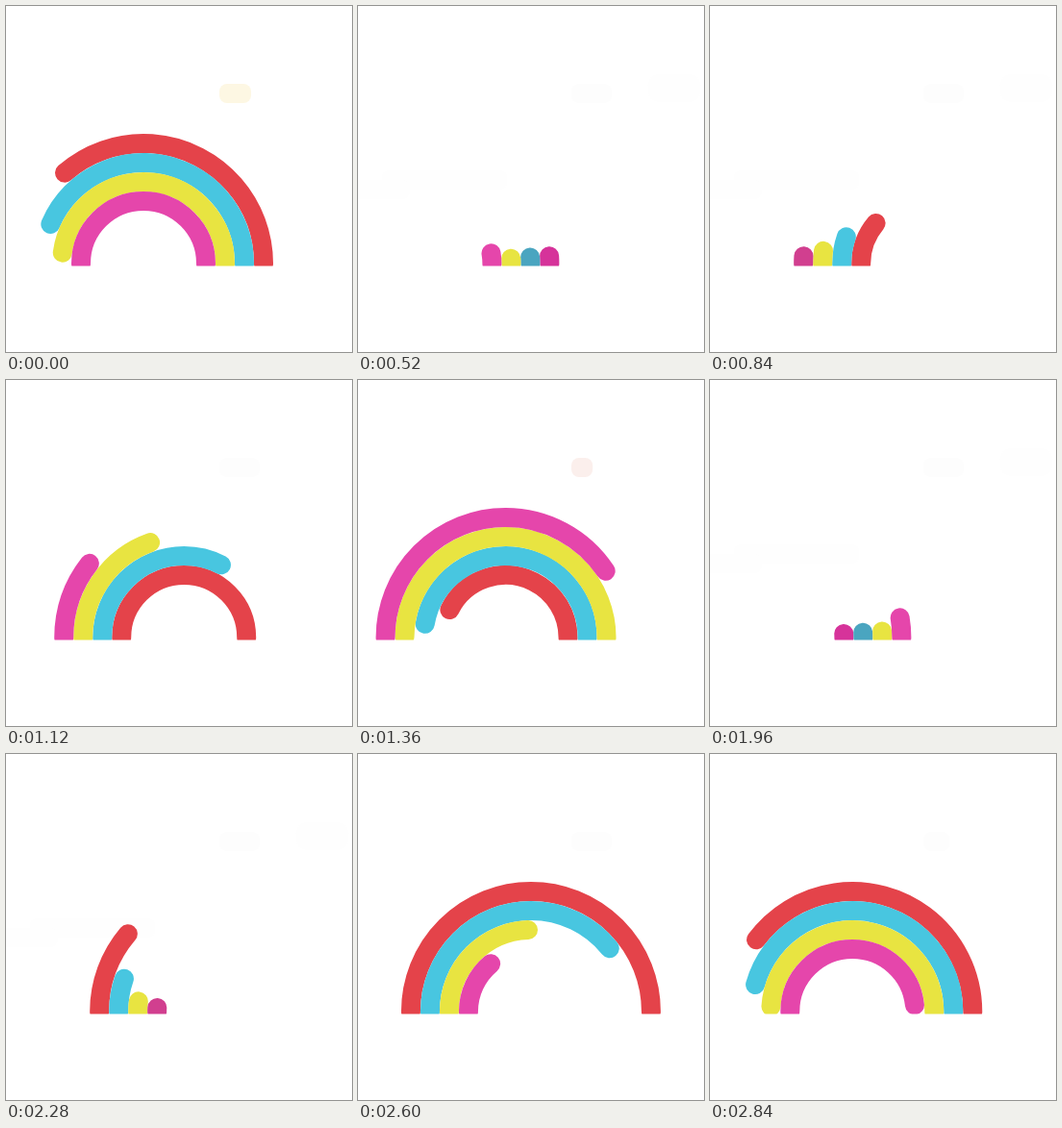
Write an HTML page with a canvas that moves like this. It is 360 px wide and 360 px high and loops after 2.88 s.

```html
<!DOCTYPE html>
<html lang="en">
<head>
<meta charset="utf-8">
<title>Walking rainbow</title>
<style>
  html, body { margin: 0; width: 100%; height: 100%; overflow: hidden; background: #fff; }
  canvas { display: block; width: 100%; height: 100%; }
</style>
</head>
<body>
<canvas id="stage" width="360" height="360"></canvas>
<script>
const ctx = document.getElementById('stage').getContext('2d');

const LOOP = 2880, STEP = 40;
const HOP = LOOP / 2;        // one stride of the whole rainbow
const HOP_START = 600;       // when the first stride begins
const TRAVEL = 520;          // time an end needs to cross the arch
const TAIL_DELAY = 560;      // the tail follows the head
const STAGGER = 96;          // delay from band to band
const STRIDE = 190;          // ground scrolled per stride
const CENTER_Y = 268, GROUND = 270.5;
const STUB = 0.02 * Math.PI; // part that stays above ground at rest

// Bands in the order they leap; tints apply while they wait as stubs.
const BANDS = [
  { color: '#e4434a', landed: '#d6339a' },
  { color: '#48c6e0', landed: '#4aa5c0' },
  { color: '#e8e441' },
  { color: '#e546ab', waiting: '#d13f8f' }
];

const mod = (a, n) => ((a % n) + n) % n;
const clamp = (v, lo = 0, hi = 1) => Math.min(hi, Math.max(lo, v));
const ease = u => 0.2 * u + 0.8 * u ** 2.5;
const sweep = time => (Math.PI - STUB) * ease(clamp(time / TRAVEL));

function pill(x, y, w, h, color) {
  ctx.fillStyle = color;
  ctx.beginPath();
  ctx.roundRect(x, y, w, h, Math.min(w, h) * 0.4);
  ctx.fill();
}

function drawClouds(t) {
  const phase = mod(t + 80, HOP) - 80;
  let color = '#fdfdfd';
  if (t < 80) color = '#fdf7e3';
  else if (t >= 1320 && t < 1400) color = '#fbefec';
  pill(222, 81, clamp(33 + phase * 0.135, 22, 42), 20, color);
  if (phase >= 200 && phase < 900) pill(302, 71, 54, 29, '#fefefe');
  if (phase >= 500 && phase < 900) {
    pill(25, 171, 130, 20, '#fefefe');
    pill(-10, 181, 64, 20, '#fefefe');
  }
}

function drawBand(band, order, radius, centerX, time) {
  const headTime = time - order * STAGGER;
  const tailTime = headTime - TAIL_DELAY;
  const head = STUB + sweep(headTime);
  const tail = sweep(tailTime);
  let color = band.color;
  if (headTime <= 0 && band.waiting) color = band.waiting;
  if (tailTime >= TRAVEL && band.landed) color = band.landed;
  ctx.strokeStyle = color;
  ctx.beginPath();
  ctx.arc(centerX, CENTER_Y, radius, Math.PI + tail, Math.PI + head);
  ctx.stroke();
}

function draw(t) {
  ctx.fillStyle = '#fff';
  ctx.fillRect(0, 0, 360, 360);
  drawClouds(t);

  const time = mod(t - HOP_START, HOP);
  const outward = t >= HOP_START && t < HOP_START + HOP; // first band is innermost
  const centerX = 143 - STRIDE * (time - 840) / HOP;

  ctx.save();
  ctx.beginPath();
  ctx.rect(0, 0, 360, GROUND);
  ctx.clip();
  ctx.lineWidth = 20;
  ctx.lineCap = 'round';
  BANDS.forEach((band, i) => {
    const radius = 65 + 20 * (outward ? i : 3 - i);
    drawBand(band, i, radius, centerX, time);
  });
  ctx.restore();
}

const start = performance.now();
function tick() {
  const elapsed = (performance.now() - start) % LOOP;
  draw(Math.floor(elapsed / STEP) * STEP);
  requestAnimationFrame(tick);
}
tick();
</script>
</body>
</html>
```
